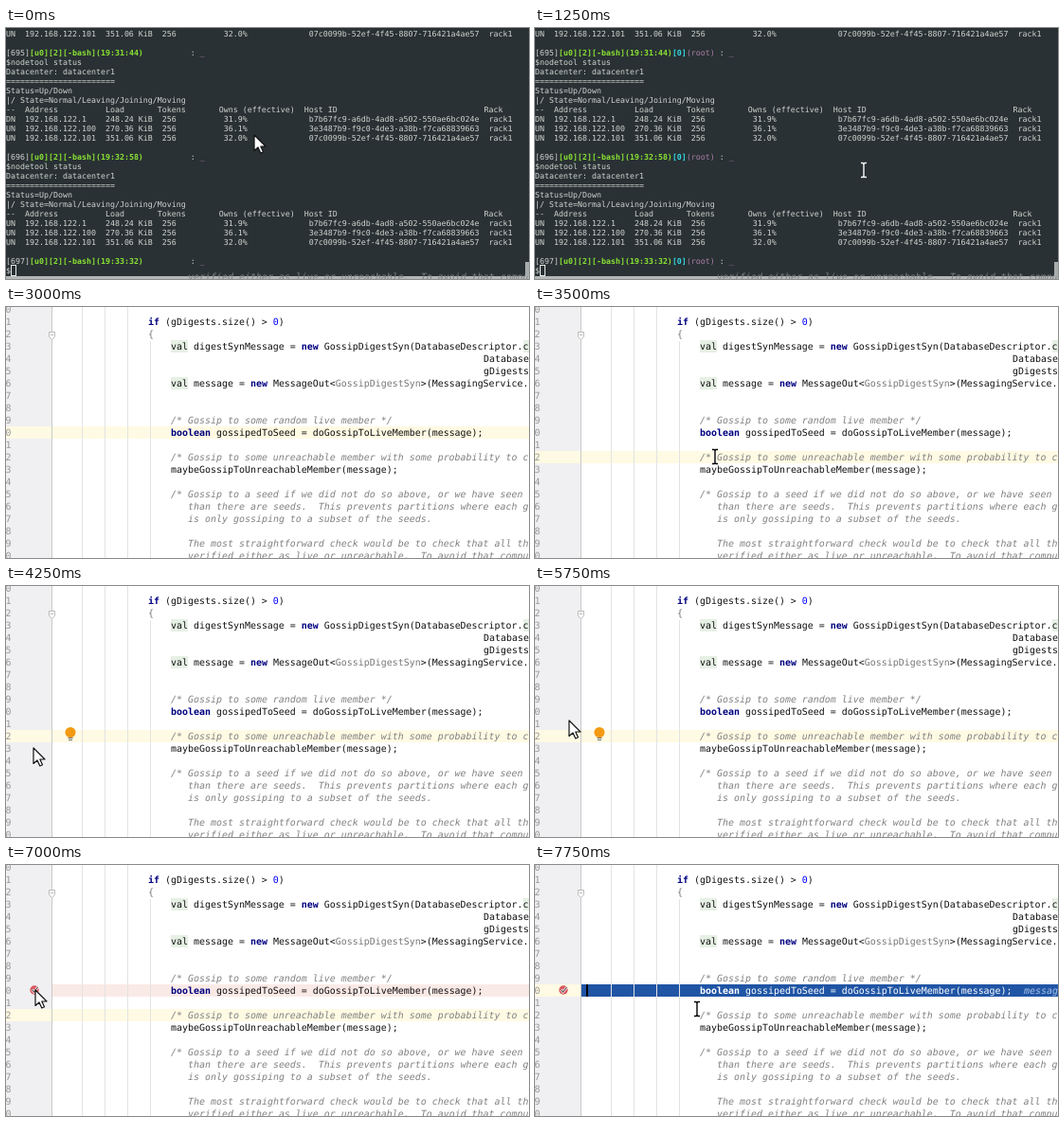
Write an HTML page that moves like this. It is 552 px wide and 265 px high and loops after 8000 ms.

```html
<!DOCTYPE html>
<html lang="en">
<head>
<meta charset="utf-8">
<title>Terminal and editor</title>
<style>
html, body { margin: 0; width: 100%; height: 100%; overflow: hidden; background: #fff; }
svg { display: block; width: 552px; height: 265px; }
text { font-family: "DejaVu Sans Mono", monospace; white-space: pre; text-rendering: geometricPrecision; }
#term text { font-size: 8.305px; fill: #d0d4d0; }
#code text, .behind { font-size: 9.968px; fill: #111; }
#term .green { fill: #8ae234; font-weight: bold; }
#term .cyan { fill: #34d5e2; font-weight: bold; }
#term .root { fill: #ad7fa8; }
#code .key { fill: #000080; font-weight: bold; }
#code .num { fill: #0000ff; }
#code .dim { fill: #777; }
#code .note { fill: #808080; font-style: italic; }
#code .line { fill: #999; }
#code .stop, #code .stop .key { fill: #fff; }
#code .hint { fill: #a9c3e8; font-style: italic; }
#term text.behind { font-size: 9.968px; font-style: italic; fill: #7c8284; }
</style>
</head>
<body>
<svg viewBox="0 0 552 265">
  <g id="term">
    <rect width="552" height="265" fill="#293134"/>
    <rect y="262" width="552" height="3" fill="#b4b7b7"/>
    <text class="behind" x="192" y="266">verified either as live or unreachable.  To avoid that computation</text>
    <g id="rows"></g>
    <rect id="block" x="5.5" y="250.5" width="5" height="11" stroke="#e8ebe8"/>
    <rect id="thumb" x="548" y="247" width="4" height="15"/>
  </g>
  <g id="code">
    <rect width="552" height="265" fill="#fff"/>
    <rect width="48" height="265" fill="#f0eff1"/>
    <rect id="caretRow" width="552" height="13" fill="#fffae3"/>
    <rect id="breakRow" x="49" y="126" width="503" height="13"/>
    <g id="guides" stroke="#e3e3e3"></g>
    <path d="M48.5 0V265" stroke="#c9c9c9"/>
    <path d="M45.5 26.5h6v5l-3 3l-3-3zM47 29.5h3" fill="#fff" stroke="#bbb"/>
    <g fill="#e6f0e4">
      <rect x="174" y="35" width="18" height="13"/>
      <rect x="174" y="74" width="18" height="13"/>
      <rect x="546" y="35" width="6" height="13"/>
    </g>
    <g id="source"></g>
    <g id="bulb">
      <circle cx="68" cy="154.5" r="5.5" fill="#f39a12"/>
      <path d="M65.5 160.5h5M66 162.5h4" stroke="#6b6b6b"/>
    </g>
    <g id="dot">
      <circle cx="30" cy="132" r="4.7" fill="#db5860"/>
      <path d="M27.5 131.5l2 2.5l4-5" fill="none" stroke="#fff" stroke-width="2.6"/>
      <path d="M27.5 131.5l2 2.5l4-5" fill="none" stroke="#5c4a4a" stroke-width="1.2"/>
    </g>
    <rect id="caret" x="54" y="126" width="2" height="13" fill="#000"/>
  </g>
  <path id="arrow" d="M0 0V16.5L4 13L6.8 19L9.5 17.8L6.8 12H12Z" fill="#fff" stroke="#111" stroke-width="1.2" stroke-linejoin="round"/>
  <g id="beam" fill="none">
    <path id="beamEdge" d="M-3-7.5H-1L0-6.5L1-7.5H3M0-6.5V6.5M-3 7.5H-1L0 6.5L1 7.5H3" stroke-width="3"/>
    <path id="beamCore" d="M-3-7.5H-1L0-6.5L1-7.5H3M0-6.5V6.5M-3 7.5H-1L0 6.5L1 7.5H3" stroke-width="1.4"/>
  </g>
</svg>
<script>
const $ = id => document.getElementById(id);
const esc = s => s.replace(/&/g, '&amp;').replace(/</g, '&lt;');
const span = (cls, s) => `<tspan class="${cls}">${esc(s)}</tspan>`;
const text = (x, y, body, cls = '') => `<text x="${x}" y="${y}" class="${cls}">${body}</text>`;
const show = (id, on) => $(id).style.display = on ? '' : 'none';

// Terminal: 5 px columns, 10 px rows
const node = (state, ip, load, owns, id) =>
  `${state}  ${ip.padEnd(17)}${load} KiB  256${' '.repeat(10)}${owns}`.padEnd(64) + id + '  rack1';
const nodes = state => [
  node(state, '192.168.122.1', '248.24', '31.9%', 'b7b67fc9-a6db-4ad8-a502-550ae6bc024e'),
  node('UN', '192.168.122.100', '270.36', '36.1%', '3e3487b9-f9c0-4de3-a38b-f7ca68839663'),
  node('UN', '192.168.122.101', '351.06', '32.0%', '07c0099b-52ef-4f45-8807-716421a4ae57')
];
const head = '--  Address'.padEnd(21) + 'Load'.padEnd(11) + 'Tokens'.padEnd(13) +
  'Owns (effective)'.padEnd(18) + 'Host ID'.padEnd(38) + 'Rack';
const status = state => ['$nodetool status', 'Datacenter: datacenter1', '='.repeat(23),
  'Status=Up/Down', '|/ State=Normal/Leaving/Joining/Moving', head, ...nodes(state), ''].map(esc);
const prompt = (n, time) => `[${n}]` + span('green', `[u0][2][-bash](${time})`) +
  `<tspan class="blink">${span('cyan', '[0]')}${span('root', '(root)')}</tspan> : ` + span('root', '_');

$('rows').innerHTML = [
  nodes('UN')[2], '',
  prompt(695, '19:31:44'), ...status('DN'),
  prompt(696, '19:32:58'), ...status('UN'),
  prompt(697, '19:33:32'), '$'
].map((s, i) => text(0, 9.4 + 10 * i, s)).join('');

// Editor: 6 px columns, 13 px rows
const key = s => span('key', s);
const rowY = n => 6 + 13 * n;
const note = (n, x, s) => text(x, rowY(n), s, 'note');
const live = key('boolean') + ' gossipedToSeed = doGossipToLiveMember(message);';

$('guides').innerHTML = [80, 104, 128, 152]
  .map(x => `<path d="M${x + .5} ${x > 150 ? 36 : 0}V265"/>`).join('');
$('source').innerHTML =
  Array.from({ length: 21 }, (_, n) => text(-.5, rowY(n), n % 10, 'line')).join('') +
  text(150, rowY(1), key('if') + ' (gDigests.size() > ' + span('num', '0') + ')') +
  text(150, rowY(2), '{', 'dim') +
  text(174, rowY(3), 'val digestSynMessage = ' + key('new') + ' GossipDigestSyn(DatabaseDescriptor.c') +
  text(504, rowY(4), 'Database') +
  text(504, rowY(5), 'gDigests') +
  text(174, rowY(6), 'val message = ' + key('new') + ' MessageOut&lt;' +
    span('dim', 'GossipDigestSyn') + '>(MessagingService.') +
  note(9, 174, '/* Gossip to some random live member */') +
  `<g id="live">${text(174, rowY(10), live)}</g>` +
  `<g id="hint">${text(516, rowY(10), 'message', 'hint')}</g>` +
  note(12, 174, '/* Gossip to some unreachable member with some probability to check') +
  text(174, rowY(13), 'maybeGossipToUnreachableMember(message);') +
  note(15, 174, '/* Gossip to a seed if we did not do so above, or we have seen less') +
  note(16, 192, 'than there are seeds.  This prevents partitions where each group') +
  note(17, 192, 'is only gossiping to a subset of the seeds.') +
  note(19, 192, 'The most straightforward check would be to check that all the') +
  note(20, 192, 'verified either as live or unreachable.  To avoid that computation');

// Pointer stops: time, shape, x, y
const stops = [
  [0, 'arrow', 262, 113], [250, 'beam', 305, 132], [500, 'beam', 347, 150],
  [2500, 'beam', 479, 137], [3000, '', 0, 0], [3500, 'beam', 190, 158],
  [4000, 'beam', 149, 163], [4250, 'arrow', 29, 171], [4500, 'arrow', 33, 175],
  [4750, 'arrow', 37, 155], [5000, 'arrow', 36, 132], [5250, 'arrow', 45, 150],
  [5500, 'arrow', 53, 166], [5750, 'arrow', 36, 142], [6000, 'arrow', 12, 160],
  [6250, 'arrow', 22, 174], [6500, 'arrow', 38, 150], [6750, 'arrow', 31, 132],
  [7250, 'beam', 70, 150], [7500, 'beam', 125, 173], [7750, 'beam', 171, 152]
];
const blinks = document.querySelectorAll('.blink');

function draw(t) {
  const editor = t >= 3000, stopped = t >= 7500;
  show('term', !editor);
  show('code', editor);

  const lit = t >= 1250 || (t >= 250 && t < 750);
  blinks.forEach(b => b.style.visibility = lit ? 'visible' : 'hidden');
  show('block', t < 2500);
  $('block').setAttribute('fill', t < 2000 ? 'none' : '#e8ebe8');
  $('thumb').setAttribute('fill', t < 2500 ? '#a8acac' : '#e9663c');

  $('caretRow').setAttribute('y', t < 3500 || stopped ? 126 : 152);
  $('breakRow').setAttribute('fill', stopped ? '#2055a5' : '#faeae6');
  show('breakRow', t >= 7000);
  show('dot', t >= 7000);
  show('bulb', t >= 4000 && t < 6750);
  show('caret', stopped);
  show('hint', stopped);
  $('live').firstChild.setAttribute('class', stopped ? 'stop' : '');

  const [, shape, x, y] = stops.filter(s => s[0] <= t).pop();
  for (const id of ['arrow', 'beam']) show(id, id === shape);
  if (shape) $(shape).setAttribute('transform', `translate(${x} ${y})`);
  $('beamEdge').setAttribute('stroke', editor ? '#fff' : '#20272a');
  $('beamCore').setAttribute('stroke', editor ? '#000' : '#fff');
}

const start = performance.now();
function tick() {
  draw((performance.now() - start) % 8000);
  requestAnimationFrame(tick);
}
tick();
</script>
</body>
</html>
```
